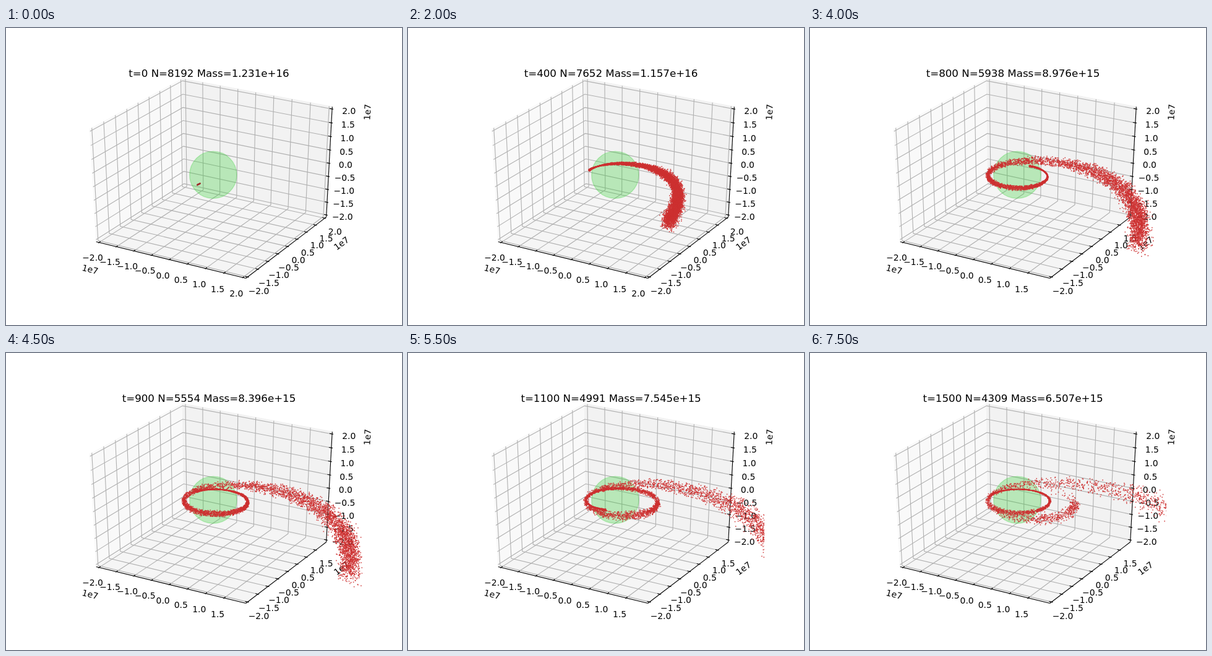
Write an HTML page with a canvas that moves like this. It is 640 px wide and 480 px high and loops after 8 s.

```html
<!DOCTYPE html>
<html lang="en">
<head>
<meta charset="utf-8">
<title>Debris stream</title>
<style>
  html, body { margin: 0; width: 100%; height: 100%; overflow: hidden; background: #fff; }
  svg, canvas { position: absolute; left: 0; top: 0; width: 640px; height: 480px; }
  text { font: 13.89px "DejaVu Sans", sans-serif; text-anchor: middle; }
  #title { font-size: 16.67px; }
  .grid { fill: none; stroke: #b0b0b0; stroke-width: 1.11; }
  .axis { fill: none; stroke: #000; stroke-width: 1.11; }
</style>
</head>
<body>
<svg id="scene" viewBox="0 0 640 480">
  <g id="plot"></g>
  <circle cx="334.8" cy="237.4" r="38" fill="#32cd32" fill-opacity=".3"
          stroke="#32cd32" stroke-opacity=".3" stroke-width="1.39"/>
  <text id="title" x="328" y="79"></text>
</svg>
<canvas id="dots" width="640" height="480"></canvas>
<script>
const plot = document.getElementById('plot');
const title = document.getElementById('title');
const ctx = document.getElementById('dots').getContext('2d');

const STEP_MS = 500, STEPS = 16;
const COUNT = [8192, 8186, 8092, 7910, 7652, 7247, 6811, 6370,
               5938, 5554, 5249, 4991, 4782, 4598, 4447, 4309];
const MASS = [12.31, 12.30, 12.20, 11.95, 11.57, 10.96, 10.29, 9.628,
              8.976, 8.396, 7.935, 7.545, 7.228, 6.948, 6.718, 6.507];

// Perspective view: elevation 30, azimuth -60, distance 10, unit cube round the origin
function project(x, y, z) {
  const depth = 10 - (0.433 * x - 0.75 * y + 0.5 * z);
  return [
    80 + (0.095 + (0.866 * x + 0.5 * y) / depth) * 2681,
    427.2 - (0.095 + (-0.25 * x + 0.433 * y + 0.866 * z) / depth) * 1998
  ];
}

/* ---- axes ---- */
const H = 0.5 + 1 / 48;      // half size of the drawn box
const LABEL = H + 0.075;     // distance of the tick labels
const TICK_IN = H - 0.0167, TICK_OUT = H + 0.0083;

function add(name, attrs, parent = plot) {
  const el = document.createElementNS('http://www.w3.org/2000/svg', name);
  for (const key in attrs) el.setAttribute(key, attrs[key]);
  parent.append(el);
  return el;
}
const points = list => list.map(p => project(...p).map(v => v.toFixed(2)).join()).join(' ');
const line = (cls, list, parent) => add('polyline', { class: cls, points: points(list) }, parent);
const pane = (fill, list) => add('polygon', { fill, stroke: fill, points: points(list) });

pane('#f9f9f9', [[-H, -H, -H], [-H, H, -H], [-H, H, H], [-H, -H, H]]);
pane('#f2f2f2', [[-H, H, -H], [H, H, -H], [H, H, H], [-H, H, H]]);
pane('#f5f5f5', [[-H, -H, -H], [H, -H, -H], [H, H, -H], [-H, H, -H]]);

const AXES = [
  { ends: [[-H, -H, -H], [H, -H, -H]],
    grid: v => [[v, -H, -H], [v, H, -H], [v, H, H]],
    tick: v => [[v, -TICK_IN, -H], [v, -TICK_OUT, -H]],
    label: v => [v, -LABEL, -LABEL] },
  { ends: [[H, -H, -H], [H, H, -H]],
    grid: v => [[H, v, -H], [-H, v, -H], [-H, v, H]],
    tick: v => [[TICK_IN, v, -H], [TICK_OUT, v, -H]],
    label: v => [LABEL, v, -LABEL] },
  { ends: [[H, H, -H], [H, H, H]],
    grid: v => [[-H, -H, v], [-H, H, v], [H, H, v]],
    tick: v => [[TICK_IN, H, v], [TICK_OUT, H, v]],
    label: v => [LABEL, LABEL, v] }
];
const gridLayer = add('g', {}), axisLayer = add('g', {});
const lastTicks = [];        // the 2.0 marks of x and y, dropped later on

AXES.forEach((axis, n) => {
  line('axis', axis.ends, axisLayer);
  for (let i = -4; i <= 4; i++) {
    const v = i / 8;
    const [x, y] = project(...axis.label(v));
    const text = add('text', { x: x.toFixed(2), y: (y + 10.2).toFixed(2) }, axisLayer);
    text.textContent = (i / 2).toFixed(1).replace('-', '\u2212');
    const parts = [line('grid', axis.grid(v), gridLayer), line('axis', axis.tick(v), axisLayer), text];
    if (i === 4 && n < 2) lastTicks.push(...parts);
  }
});
for (const [x, y, turn] of [[136, 390, 14], [542, 348, -37], [584, 136, -87]]) {
  add('text', { y: 5, transform: `translate(${x} ${y}) rotate(${turn})` }).textContent = '1e7';
}

/* ---- debris ---- */
let seed = 7321;
function random() {
  seed = (seed + 0x6d2b79f5) | 0;
  let t = Math.imul(seed ^ (seed >>> 15), 1 | seed);
  t = (t + Math.imul(t ^ (t >>> 7), 61 | t)) ^ t;
  return ((t ^ (t >>> 14)) >>> 0) / 4294967296;
}
const spread = () => random() + random() - 1;

// Lengths in units of 4e7 m, times in seconds
const GM = 6.228e-9, R0 = 0.175, DT = 25;
const HEAD_START = 1150, STEP_TIME = 1000;
const CIRCULAR = Math.sqrt(GM / R0);
const frames = Array.from({ length: STEPS }, () => []);

// Follow one fragment on its orbit and note where it is at every step
function trace(index) {
  const speed = 0.975 + 0.445 * Math.pow(random(), 1.1);
  const e = speed * speed - 1;
  const wide = Math.max(0.06, Math.min(1, Math.pow(Math.abs(e) / 0.3, 0.7))) *
               (1 - 0.4 * Math.max(0, Math.min(1, e)));
  const angle = 200 * Math.PI / 180 + 0.1 * wide * spread();
  const scale = 1 + 0.1 * wide * spread();
  const tilt = 0.2 * wide * spread();
  let life = Infinity;
  if (e > 0.17 && e < 0.45 && random() < 0.9) {
    const period = 2 * Math.PI * Math.sqrt(Math.pow(R0 / (1 - e), 3) / GM);
    life = period * (1.5 + 0.08 * spread());
  }

  let x = R0 * Math.cos(angle), y = R0 * Math.sin(angle);
  let vx = -CIRCULAR * speed * Math.sin(angle), vy = CIRCULAR * speed * Math.cos(angle);
  let time = 0;
  for (let step = 1; step < STEPS; step++) {
    const until = HEAD_START + step * STEP_TIME;
    if (index >= COUNT[step] || until > life) return;
    for (; time < until; time += DT) {
      x += vx * DT / 2;
      y += vy * DT / 2;
      const r2 = x * x + y * y, pull = GM * DT / (r2 * Math.sqrt(r2));
      vx -= x * pull;
      vy -= y * pull;
      x += vx * DT / 2;
      y += vy * DT / 2;
    }
    const [px, py] = project(x * scale, y * scale, Math.hypot(x, y) * tilt);
    if (px < 578) frames[step].push(px, py);
  }
}
for (let i = 0; i < COUNT[0]; i++) trace(i);

// Before the break-up: one small clump
for (let i = 0; i < 50; i++) {
  const k = random();
  frames[0].push(309.2 + 4.6 * k + 0.5 * spread(), 253.6 - 2.4 * k + 0.5 * spread());
}

ctx.beginPath();
ctx.rect(80, 57.6, 496, 369.6);
ctx.clip();

function draw(step) {
  title.textContent = `t=${step * 100} N=${COUNT[step]} Mass=${(MASS[step] * 1e15).toExponential(3)}`;
  for (const el of lastTicks) el.setAttribute('visibility', step < 8 ? 'visible' : 'hidden');
  ctx.clearRect(0, 0, 640, 480);
  ctx.fillStyle = step ? 'rgba(205, 50, 50, 0.88)' : '#a03030';
  const dots = frames[step];
  for (let i = 0; i < dots.length; i += 2) ctx.fillRect(dots[i] - 0.8, dots[i + 1] - 0.8, 1.6, 1.6);
}

let shown = -1;
const start = performance.now();
function tick() {
  const step = Math.floor((performance.now() - start) / STEP_MS) % STEPS;
  if (step !== shown) draw(shown = step);
  requestAnimationFrame(tick);
}
tick();
</script>
</body>
</html>
```
